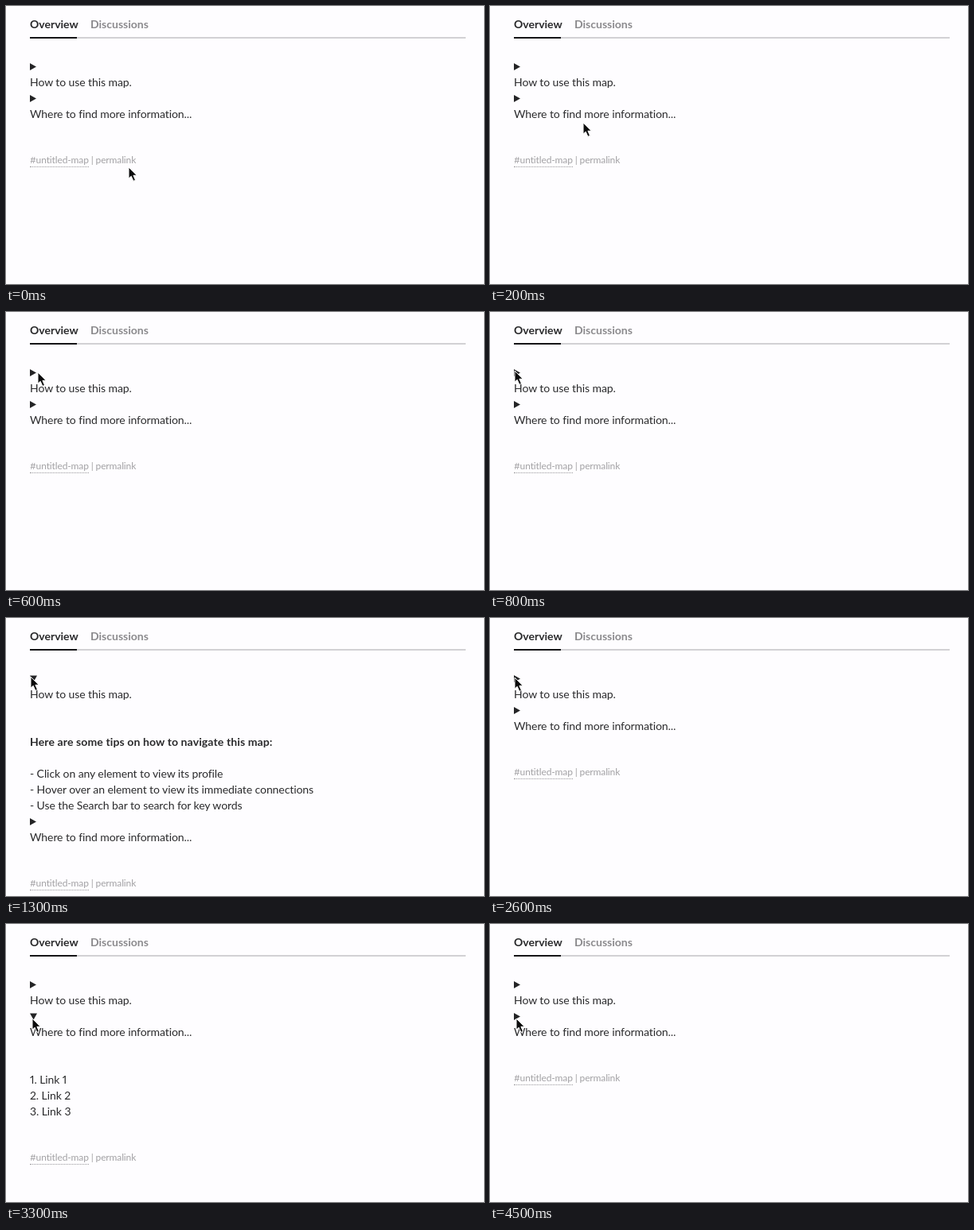
Recreate the animation shown at these times as an HTML page. Size 600 px wide and 350 px high, loop 5200 ms.

```html
<!DOCTYPE html>
<html lang="en">
<head>
<meta charset="utf-8">
<title>Map overview</title>
<style>
html, body { margin: 0; width: 100%; height: 100%; overflow: hidden; background: #fefdff; }
#stage {
  position: relative; width: 600px; height: 350px; overflow: hidden;
  font: 14px/20px Lato, "Open Sans", sans-serif; color: #2a2a2c; white-space: nowrap;
  letter-spacing: -.08px; font-variant-ligatures: none; font-variant-numeric: proportional-nums;
}
#stage * { position: absolute; }
#stage a, #stage span { position: static; }
.text, .group { left: 30px; }
.group { top: 0; }
.group .text { left: 0; }
.bold { font-weight: 700; letter-spacing: .12px; }
.tab { top: 13px; letter-spacing: 0; }
.rule { left: 30px; top: 39px; width: 547px; height: 2px; background: #d2d1d4; }
.rule i { width: 59px; height: 2px; background: #151517; }
.foot { font-size: 12px; letter-spacing: -.13px; color: #a2a1a4; }
.foot a { display: inline-block; line-height: 17px; border-bottom: 1px dotted #99989b; }
.mark { left: 30px; width: 9px; height: 9px; background: #242426; clip-path: polygon(0 0, 8px 4.5px, 0 9px); }
.group .mark { left: 0; }

/* every change is a hard step on one shared clock */
.mark, .shift, .foot, .panel, .cursor { animation: 5200ms step-end infinite; }
.mark.first { animation-name: first; }
.mark.second { animation-name: second; }
.shift { animation-name: shift; }
.foot { animation-name: foot; }
.tips { animation-name: tips; }
.links { animation-name: links; }
.cursor { left: 0; top: 0; animation-name: cursor; }

@keyframes first {
  0%, 50% { clip-path: polygon(0 0, 8px 4.5px, 0 9px); }
  25% { clip-path: polygon(0 .5px, 9px .5px, 4.5px 8.5px); }
}
@keyframes second {
  0%, 86.538% { clip-path: polygon(0 0, 8px 4.5px, 0 9px); }
  63.461% { clip-path: polygon(0 .5px, 9px .5px, 4.5px 8.5px); }
}
@keyframes shift { 0%, 50% { transform: none; } 25% { transform: translateY(140px); } }
@keyframes foot {
  0%, 50%, 86.538% { transform: none; }
  25% { transform: translateY(140px); }
  63.461% { transform: translateY(100px); }
}
@keyframes tips { 0%, 50% { visibility: hidden; } 25% { visibility: visible; } }
@keyframes links { 0%, 86.538% { visibility: hidden; } 63.461% { visibility: visible; } }
@keyframes cursor {
  0% { transform: translate(154px, 203px); }
  1.923% { transform: translate(146px, 192px); }
  3.846% { transform: translate(117px, 147px); }
  5.769% { transform: translate(83px, 100px); }
  7.692% { transform: translate(60px, 75px); }
  9.615% { transform: translate(47px, 76px); }
  11.538% { transform: translate(40px, 76px); }
  13.461% { transform: translate(34px, 75px); }
  15.384% { transform: translate(31px, 74px); }
  50% { transform: translate(31px, 75px); }
  51.923% { transform: translate(31px, 83px); }
  53.846% { transform: translate(32px, 95px); }
  55.769% { transform: translate(33px, 108px); }
  57.692% { transform: translate(33px, 116px); }
  59.615%, 100% { transform: translate(33px, 119px); }
}
</style>
</head>
<body>
<div id="stage">
  <div class="text bold tab">Overview</div>
  <div class="text bold tab" style="left:106px;color:#8b8a8d">Discussions</div>
  <div class="rule"><i></i></div>

  <div class="mark first" style="top:72px"></div>
  <div class="text" style="top:86px">How to use this map.</div>
  <div class="group panel tips">
    <div class="text bold" style="top:146px">Here are some tips on how to navigate this map:</div>
    <div class="text" style="top:186px">- Click on any element to view its profile</div>
    <div class="text" style="top:206px">- Hover over an element to view its immediate connections</div>
    <div class="text" style="top:226px">- Use the Search bar to search for key words</div>
  </div>

  <div class="group shift">
    <div class="mark second" style="top:112px"></div>
    <div class="text" style="top:126px">Where to find more information...</div>
  </div>
  <div class="group panel links">
    <div class="text" style="top:186px">1. Link 1</div>
    <div class="text" style="top:206px">2. Link 2</div>
    <div class="text" style="top:226px">3. Link 3</div>
  </div>

  <div class="text foot" style="top:184px"><a>#untitled-map</a> | <span>permalink</span></div>

  <svg class="cursor" width="14" height="20" overflow="visible">
    <path d="M0 0V14.2L3.2 11.3 5.9 17.4 8.5 16.2 5.9 10.3H10.2Z" fill="#0b0b0c" stroke="#fff" stroke-width="1" stroke-linejoin="round"/>
  </svg>
</div>
</body>
</html>
```
